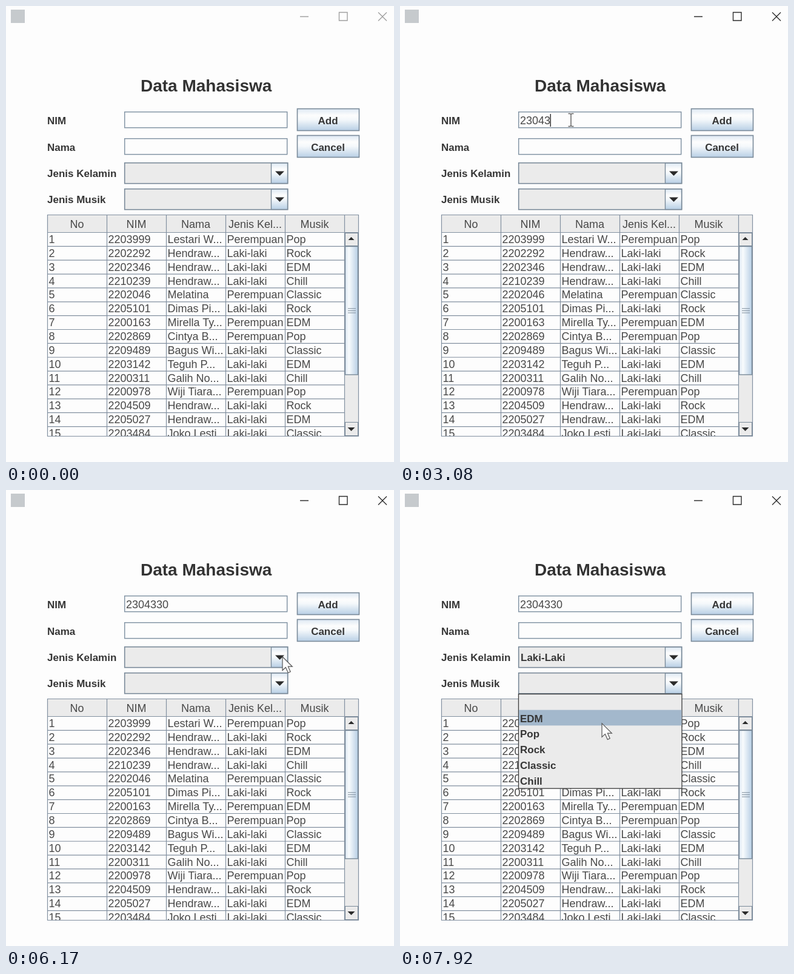
Recreate the animation shown at these times as an HTML page. Size 640 px wide and 752 px high, loop 8000 ms.

```html
<!DOCTYPE html>
<html lang="id">
<head>
<meta charset="utf-8">
<title>Data Mahasiswa</title>
<style>
  html, body { margin: 0; width: 100%; height: 100%; overflow: hidden; background: #fdfdfd; }
  svg { display: block; width: 640px; height: 752px; }
  text { font: 18px "Liberation Sans", Arial, sans-serif; fill: #484848; white-space: pre; }
  .b { font-weight: bold; font-size: 17px; fill: #363636; }
  .title { font-weight: bold; font-size: 28px; fill: #333; }
  .mid { text-anchor: middle; }
  .panel { fill: #ebebeb; }
  .edge { stroke: #7a8a99; }
  .field { fill: #fdfdfd; stroke: #8495a5; stroke-width: 1.5; }
  .grid { stroke: #8290a0; stroke-width: 1.2; fill: none; }
  .dark { fill: #2b2b2b; }
  .sel { fill: #a3b8cc; }
  #controls { fill: none; stroke-width: 1.4; }
</style>
</head>
<body>
<svg id="stage" viewBox="0 0 640 752">
  <defs>
    <linearGradient id="metal" x2="0" y2="1">
      <stop offset="0" stop-color="#dde8f3"/>
      <stop offset=".3" stop-color="#fdfdfd"/>
      <stop offset=".5" stop-color="#f4f8fb"/>
      <stop offset="1" stop-color="#b8cfe5"/>
    </linearGradient>
    <linearGradient id="thumb">
      <stop offset="0" stop-color="#dde8f3"/>
      <stop offset=".3" stop-color="#f8fbfd"/>
      <stop offset="1" stop-color="#b8cfe5"/>
    </linearGradient>
    <clipPath id="view"><rect x="68" y="374" width="490" height="335"/></clipPath>
  </defs>
  <rect width="640" height="752" fill="#fdfdfd"/>
  <rect x="8" y="6" width="23" height="22" fill="#c6cacd"/>
  <path id="controls" d="M485 17.5h14M549.5 10.5h13.5v13.5h-13.5zM614 10.5l14 14M628 10.5l-14 14"/>
  <text class="title" x="222" y="141">Data Mahasiswa</text>
  <g id="form"></g>
  <text id="nim" x="198" y="195"></text>
  <rect id="caret" y="178" width="1.4" height="21" class="dark"/>
  <text id="genderText" class="b" x="199" y="282">Laki-Laki</text>
  <g id="table"></g>
  <g id="genderList"></g>
  <g id="musicList"></g>
  <path id="arrow" d="M0 0V22.5L5.3 17.5L9.3 26.5L13.2 24.8L9.4 16.2H16.3Z" fill="#fdfdfd" stroke="#555" stroke-width="1.2"/>
  <path id="beam" d="M-4.5 -10.5H-1.5L0 -9.3L1.5 -10.5H4.5M0 -9.3V9.3M-4.5 10.5H-1.5L0 9.3L1.5 10.5H4.5" fill="none" stroke="#666" stroke-width="1.5"/>
</svg>
<script>
const $ = id => document.getElementById(id);
const rect = (x, y, w, h, attrs) => `<rect x="${x}" y="${y}" width="${w}" height="${h}" ${attrs}/>`;
const label = (x, y, s, cls = '') => `<text x="${x}" y="${y}" class="${cls}">${s}</text>`;
const tri = (x, y, w, h) => `<path class="dark" d="M${x - w / 2} ${y}h${w}l${-w / 2} ${h}z"/>`;

const button = (y, s) => rect(480.5, y + .5, 102, 36, 'fill="url(#metal)" class="edge" stroke-width="1.6"')
  + label(531, y + 26, s, 'b mid');
const combo = (y, id) => rect(195.7, y + .7, 269, 34, `id="${id}" class="panel edge" stroke-width="1.6"`)
  + rect(437.5, y + 1, 27, 33.5, 'fill="url(#metal)" class="edge" stroke-width="1.4"')
  + tri(451.5, y + 14.5, 15, 7.5);

$('form').innerHTML = label(68, 195, 'NIM', 'b') + label(68, 239, 'Nama', 'b')
  + label(68, 282, 'Jenis Kelamin', 'b') + label(68, 325, 'Jenis Musik', 'b')
  + rect(195.7, 174.7, 268, 26, 'class="field"') + rect(195.7, 218.7, 268, 26, 'class="field"')
  + button(169, 'Add') + button(213, 'Cancel') + combo(258, 'gender') + combo(301, 'music');

const rows = `2203999,Lestari W...,P,Pop
2202292,Hendraw...,L,Rock
2202346,Hendraw...,L,EDM
2210239,Hendraw...,L,Chill
2202046,Melatina,P,Classic
2205101,Dimas Pi...,L,Rock
2200163,Mirella Ty...,P,EDM
2202869,Cintya B...,P,Pop
2209489,Bagus Wi...,L,Classic
2203142,Teguh P...,L,EDM
2200311,Galih No...,L,Chill
2200978,Wiji Tiara...,P,Pop
2204509,Hendraw...,L,Rock
2205027,Hendraw...,L,EDM
2203484,Joko Lesti,L,Classic`.split('\n').map(r => r.split(','));
const sex = { P: 'Perempuan', L: 'Laki-laki' };
const colX = i => 68 + 98 * i;
const rowH = 22.86;

function buildTable() {
  let s = rect(68, 344, 514, 30, 'class="panel"');
  let lines = 'M68.5 344.5H581.5V709.5H68.5ZM68 373.5H582';
  ['No', 'NIM', 'Nama', 'Jenis Kel...', 'Musik'].forEach((h, i) => {
    s += label(colX(i) + 49, 366, h, 'mid');
    lines += `M${colX(i + 1) + .5} 344V709`;
  });
  s += '<g clip-path="url(#view)">';
  rows.forEach(([nim, name, g, music], r) => {
    const y = 374 + rowH * r;
    [r + 1, nim, name, sex[g], music].forEach((v, i) => s += label(colX(i) + 2.5, y + 17, v));
    lines += `M68 ${Math.min(y + rowH - .5, 709.5)}H558`;
  });
  s += '</g>' + rect(559, 374, 22, 335, 'class="panel"')
    + rect(559.5, 374.5, 21, 21, 'class="panel edge"') + tri(569.5, 386, 10, -5)
    + rect(559.5, 396.5, 21, 211.5, 'fill="url(#thumb)" class="edge" stroke-width="1.4"')
    + '<path d="M564 499h13M564 502.5h13M564 506h13" class="edge"/>'
    + rect(559.5, 686.5, 21, 22, 'class="panel edge"') + tri(569.5, 695, 12, 6);
  $('table').innerHTML = s + `<path class="grid" d="${lines}"/>`;
}
buildTable();

// Popup list whose highlighted row follows the pointer
const itemH = 25.7;
function popup(id, top, items) {
  const g = $(id);
  g.innerHTML = rect(195.5, top - .5, 269.5, items.length * itemH + 1.5, 'class="panel" stroke="#3c3c3c" stroke-width="1.3"')
    + rect(196, top, 268.5, itemH, 'class="sel"')
    + items.map((v, i) => label(198, top + 20 + i * itemH, v, 'b')).join('');
  const bar = g.querySelector('.sel');
  return (open, y) => {
    g.style.display = open ? '' : 'none';
    const row = Math.max(0, Math.min(items.length - 1, Math.floor((y - top) / itemH)));
    bar.setAttribute('y', top + row * itemH);
  };
}
const genderList = popup('genderList', 294, ['', 'Laki-Laki', 'Perempuan']);
const musicList = popup('musicList', 337, ['', 'EDM', 'Pop', 'Rock', 'Classic', 'Chill']);

// Pointer stops: time, x, y
const path = [
  [910, 312, 240], [1080, 288, 186], [1500, 288, 186], [1670, 282, 188], [3500, 282, 188],
  [3920, 316, 226], [5330, 316, 226], [5920, 456, 275], [6250, 456, 275],
  [6660, 378, 323], [7660, 378, 323], [7917, 333, 385], [8000, 333, 385]
];
const keys = [1920, 2170, 2500, 2750, 3000, 3330, 3410];
const focusAt = 1170, genderOpen = 6240, genderPick = 6740, musicOpen = 7570;

function pointer(t) {
  const i = Math.max(1, path.findIndex(p => p[0] >= t));
  const [t0, x0, y0] = path[i - 1], [t1, x1, y1] = path[i];
  const k = Math.max(0, (t - t0) / (t1 - t0));
  return [x0 + (x1 - x0) * k, y0 + (y1 - y0) * k];
}
const show = (id, on) => $(id).style.display = on ? '' : 'none';
const inField = (x, y) => x > 195 && x < 464 && (y > 174 && y < 201 || y > 218 && y < 245);

function draw(t) {
  const [x, y] = pointer(t);
  const visible = t >= path[0][0];
  const beam = inField(x, y);
  show('beam', visible && beam);
  show('arrow', visible && !beam);
  $(beam ? 'beam' : 'arrow').setAttribute('transform', `translate(${x} ${y})`);

  const typed = keys.filter(k => k <= t).length;
  $('nim').textContent = '2304330'.slice(0, typed);
  const since = t - (typed ? keys[typed - 1] : focusAt);
  show('caret', t >= focusAt && t < genderOpen && since % 1000 < 500);
  $('caret').setAttribute('x', 197.5 + typed * 10.01);

  $('controls').setAttribute('stroke', t < focusAt ? '#a0a0a0' : '#2e2e2e');
  show('genderText', t >= genderPick);
  $('gender').setAttribute('class', (t >= genderPick && t < musicOpen ? 'sel' : 'panel') + ' edge');
  genderList(t >= genderOpen && t < genderPick, y);
  musicList(t >= musicOpen, y);
}

const step = 1000 / 12;
function tick() {
  const t = performance.now() % 8000;
  draw(Math.floor((t + 4) / step) % 96 * step);
  requestAnimationFrame(tick);
}
tick();
</script>
</body>
</html>
```
